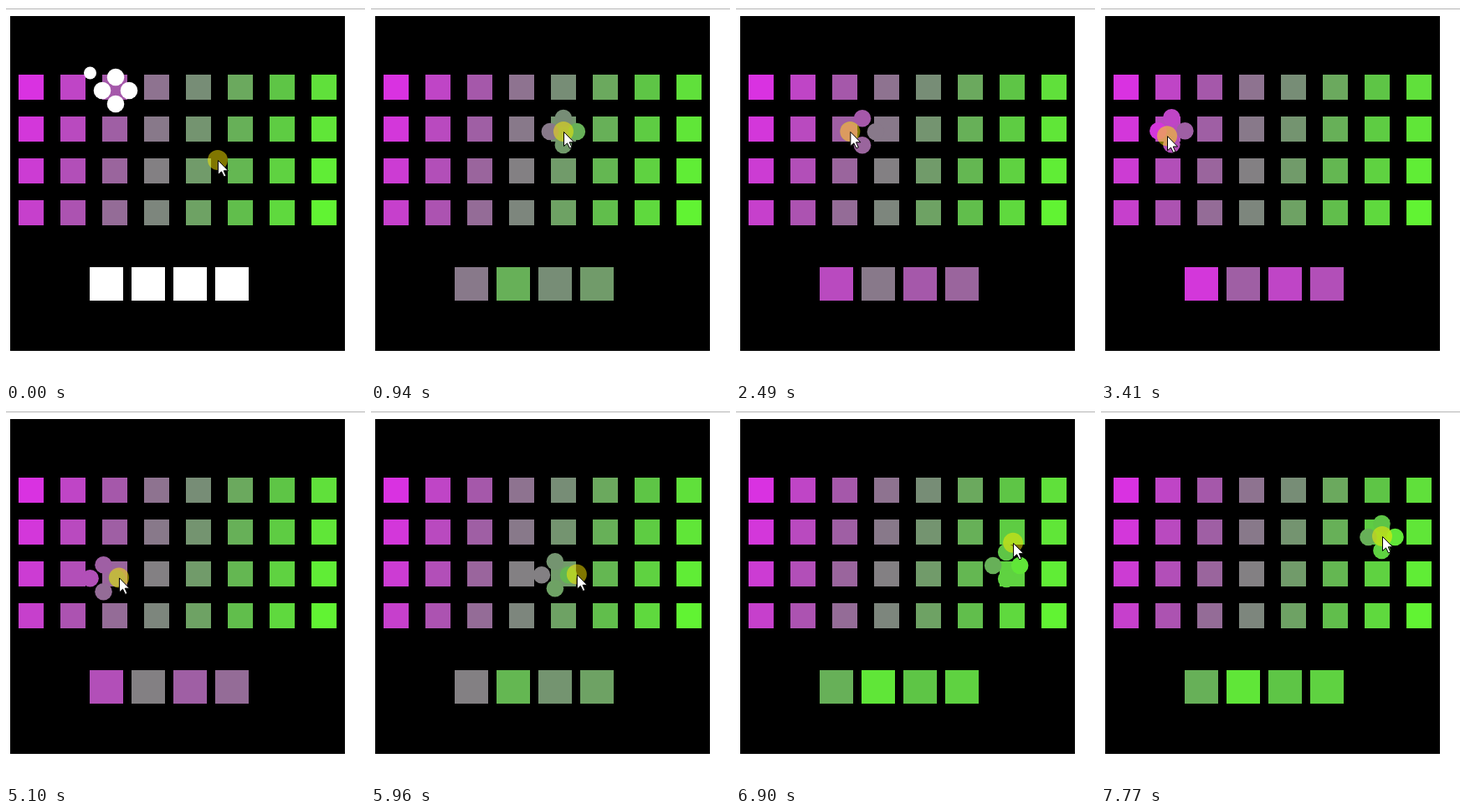
Recreate the animation shown at these times as an HTML page. Size 429x448 px, loop 7850 ms.

```html
<!DOCTYPE html>
<html lang="en">
<head>
<meta charset="utf-8">
<title>Colour neighbours</title>
<style>
  html, body { margin: 0; width: 100%; height: 100%; overflow: hidden; background: #fff; }
  svg { display: block; }
</style>
</head>
<body>
<svg id="stage" width="429" height="448" viewBox="0 0 429 448"></svg>
<script>
const LOOP = 7850, STEP = 5;
const PETAL_LAG = 160, DOT_LAG = 235;
const COLS = 8, ROWS = 4, PITCH = 50, CELL = 30, LEFT = 15, TOP = 82;
const stage = document.getElementById('stage');

// Left, right, up, down: shared by the petals and the swatches.
const SIDES = [[-1, 0], [1, 0], [0, -1], [0, 1]];

// Magenta through grey to green, evenly spaced over all cells.
const STOPS = [[217, 50, 225], [165, 88, 170], [119, 141, 118], [94, 197, 70], [97, 250, 48]];

// Pointer stops: time, x, y. Each move starts fast and slows down.
const PATH = [
  [0, 253, 184], [380, 230, 150], [1150, 230, 150], [2180, 168, 150.5],
  [3400, 79, 149], [3480, 79, 183], [4030, 81, 199], [4700, 82, 204],
  [5500, 164, 200], [6450, 294, 196], [6830, 331, 195], [6890, 331, 160],
  [7770, 336, 152]
];

const mix = (a, b, k) => a + (b - a) * k;
const easeOut = k => 1 - (1 - k) ** 1.5;

function add(tag, attrs) {
  const el = document.createElementNS('http://www.w3.org/2000/svg', tag);
  for (const key in attrs) el.setAttribute(key, attrs[key]);
  return stage.appendChild(el);
}

const rect = (x, y, width, height, fill) => add('rect', { x, y, width, height, fill });
const circle = (r, fill) => add('circle', { r, fill });

function moveTo(el, x, y) {
  el.setAttribute('cx', x);
  el.setAttribute('cy', y);
}

// Cells are numbered down the columns.
function cellColor(col, row) {
  const at = (col * ROWS + row) / (COLS * ROWS) * (STOPS.length - 1);
  const i = Math.floor(at);
  return `rgb(${STOPS[i].map((v, c) => Math.round(mix(v, STOPS[i + 1][c], at - i)))})`;
}

function pointerAt(t) {
  const next = PATH.findIndex(key => key[0] > t);
  const i = next < 0 ? PATH.length - 1 : next;
  const [t0, x0, y0] = PATH[i - 1], [t1, x1, y1] = PATH[i];
  const k = easeOut(Math.min(1, (t - t0) / (t1 - t0)));
  return { x: mix(x0, x1, k), y: mix(y0, y1, k) };
}

function cellAt({ x, y }) {
  const col = Math.floor((x - LEFT) / PITCH), row = Math.floor((y - TOP) / PITCH);
  const inside = (x - LEFT) % PITCH <= CELL && (y - TOP) % PITCH <= CELL;
  return inside ? { col, row } : null;
}

function follow(p, goal, lag) {
  const k = 1 - Math.exp(-STEP / lag);
  return { x: mix(p.x, goal.x, k), y: mix(p.y, goal.y, k) };
}

// The followers and the last touched cell depend on the path so far.
function buildTrack() {
  const track = [];
  let flower = { x: 131, y: 101 }, dot = { x: 100.5, y: 80 }, cell = null;
  for (let t = 0; t <= LOOP; t += STEP) {
    const mouse = pointerAt(t);
    cell = cellAt(mouse) || cell;
    track.push({ mouse, flower, dot, cell });
    flower = follow(flower, mouse, PETAL_LAG);
    dot = follow(dot, mouse, DOT_LAG);
  }
  return track;
}

rect(0, 0, 429, 448, '#fff');
rect(0, 3, 429, 1, '#b4b4b4');
rect(5, 12, 400, 400, '#000');
for (let col = 0; col < COLS; col++) {
  for (let row = 0; row < ROWS; row++) {
    rect(LEFT + col * PITCH, TOP + row * PITCH, CELL, CELL, cellColor(col, row));
  }
}
const swatches = SIDES.map((_, i) => rect(100 + i * PITCH, 312, 40, 40, '#fff'));
const dotEl = circle(7.5, '#fff');
const petals = SIDES.map(() => circle(10.3, '#fff'));
const halo = circle(12, 'rgba(255,235,0,.5)');
const arrow = add('path', {
  d: 'M0 0V17L4 13.4L7 19.5L9.5 18.5L6.7 12.3H12Z',
  fill: '#fff', stroke: '#000', 'stroke-width': 1
});

const track = buildTrack();

function draw(t) {
  const { mouse, flower, dot, cell } = track[Math.floor(t / STEP)];
  SIDES.forEach(([dx, dy], i) => {
    const fill = cell ? cellColor(cell.col + dx, cell.row + dy) : '#fff';
    swatches[i].setAttribute('fill', fill);
    petals[i].setAttribute('fill', fill);
    moveTo(petals[i], flower.x + dx * 16, flower.y + dy * 16);
  });
  // The dot only shows until the first cell is touched.
  dotEl.setAttribute('visibility', cell ? 'hidden' : 'visible');
  moveTo(dotEl, dot.x, dot.y);
  moveTo(halo, mouse.x, mouse.y);
  arrow.setAttribute('transform', `translate(${mouse.x + 0.5} ${mouse.y + 0.5})`);
}

let start = null;
function tick(now) {
  if (start === null) start = now;
  draw(Math.max(0, now - start) % LOOP);
  requestAnimationFrame(tick);
}
draw(0);
requestAnimationFrame(tick);
</script>
</body>
</html>
```
